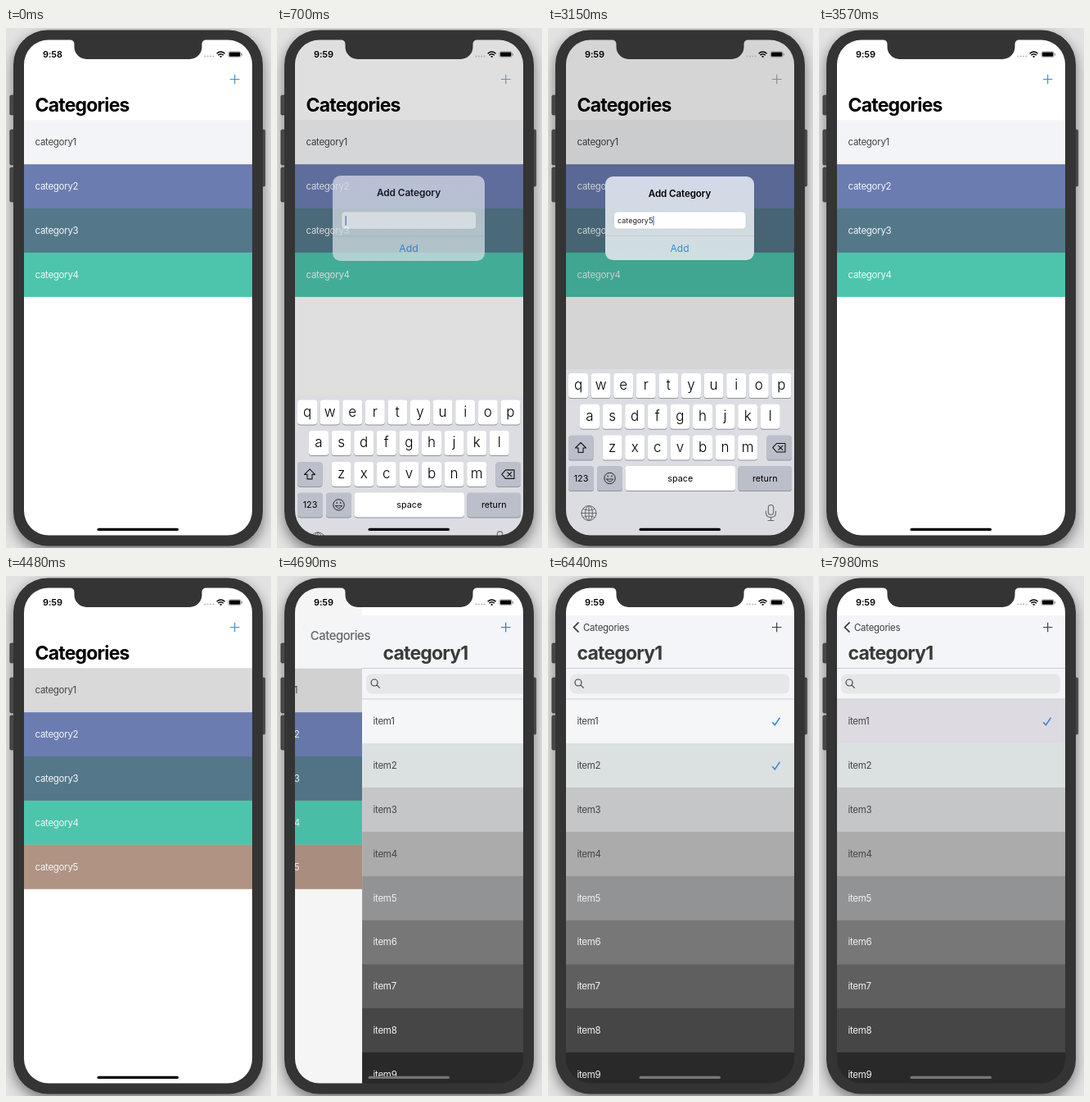
These frames come from a looping animation (324x634 px, 8000 ms). An HTML page:

```html
<!DOCTYPE html>
<html lang="en">
<head>
<meta charset="utf-8">
<title>Category list</title>
<style>
  html, body { margin: 0; width: 100%; height: 100%; overflow: hidden; background: #d2d2d2; }
  svg { display: block; width: 324px; height: 634px; }
  text { font-family: Inter, Roboto, "Liberation Sans", sans-serif; }
  .row { font-size: 11.5px; letter-spacing: -.025em; }
  .title { font-size: 23px; font-weight: 700; letter-spacing: -.035em; }
  .key { font-size: 17px; font-weight: 300; text-anchor: middle; }
  .label { font-size: 10.8px; text-anchor: middle; }
</style>
</head>
<body>
<svg id="stage" viewBox="0 0 324 634" xmlns="http://www.w3.org/2000/svg">
  <defs>
    <clipPath id="screen"><rect x="21.500" y="13" width="280" height="607"/></clipPath>
    <filter id="soft" x="-20%" y="-20%" width="140%" height="140%"><feGaussianBlur stdDeviation="8"/></filter>
    <linearGradient id="glass" x1="0" y1="0" x2="0" y2="1">
      <stop offset="0" stop-color="#d4d9e8"/>
      <stop offset=".5" stop-color="#d2dae1"/>
      <stop offset="1" stop-color="#cfdfe0"/>
    </linearGradient>
  </defs>

  <rect width="324" height="634" fill="#e2e2e2"/>
  <rect x="9" y="8" width="305" height="630" rx="42" opacity=".48" filter="url(#soft)"/>
  <g fill="#484848" stroke="#2c2c2c" stroke-width=".6">
    <rect x="4.800" y="82" width="6" height="24" rx="1.500"/>
    <rect x="4.800" y="124" width="6" height="43" rx="1.500"/>
    <rect x="4.800" y="170" width="6" height="42" rx="1.500"/>
    <rect x="311" y="124" width="5.700" height="69" rx="1.500"/>
  </g>

  <g clip-path="url(#screen)">
    <rect x="20" y="12" width="284" height="610" fill="#fff"/>
    <g id="list"></g>
    <rect id="shade" x="20" y="12" width="284" height="610"/>
    <rect id="bar" x="20" y="48" width="284" height="65" fill="#f4f5f8"/>
    <g id="detail"></g>

    <text id="backTitle">Categories</text>
    <text id="itemTitle" class="title" y="102" fill="#3a3a3a">category1</text>
    <path id="chevron" d="M37.500 56.500L31.500 62.500L37.500 68.500" fill="none" stroke="#333" stroke-width="1.700"/>

    <rect id="dim" x="20" y="12" width="284" height="610"/>
    <path id="plus" d="M274 62.500H285.500M279.700 56.800V68.300" fill="none" stroke-width="1.200"/>

    <text id="clock" x="45" y="36" font-size="11" font-weight="600" letter-spacing="-.1"></text>
    <path d="M242.500 34.500H255" stroke="#aaa" stroke-width="1.700" stroke-dasharray="1.700 1.700"/>
    <g fill="none" stroke="#000" stroke-width="1.500">
      <path d="M257.600 31.200Q262.600 26.800 267.600 31.200M259.400 33.100Q262.600 30.300 265.800 33.100"/>
      <path d="M261.600 34.900H263.600" stroke-width="1.600"/>
    </g>
    <rect x="271.800" y="28.700" width="15.600" height="7" rx="2" fill="none" stroke="#999" stroke-width=".7"/>
    <rect x="272.800" y="29.600" width="13.600" height="5.200" rx="1.200"/>
    <rect x="288" y="31" width="1" height="2.400" rx=".5" fill="#888"/>

    <g id="keyboard"></g>

    <g id="alert">
      <rect x="70" y="181" width="182" height="102" rx="9.500" fill="url(#glass)"/>
      <text x="161" y="205.500" font-size="11.600" font-weight="600" text-anchor="middle" letter-spacing="-.1">Add Category</text>
      <rect x="80.500" y="224" width="161.500" height="21" rx="4.500" fill="#fff" stroke="#c3c9d0" stroke-width=".7"/>
      <text id="entry" x="85" y="238" font-size="9" fill="#222"></text>
      <rect id="caret" y="229" width="1.100" height="11.500" fill="#4267d8"/>
      <path d="M70 253.300H252" stroke="#bac4cb" stroke-width=".7"/>
      <text x="161" y="272.500" font-size="12" text-anchor="middle" fill="#318ae2">Add</text>
    </g>
    <rect id="home" x="111.500" y="609.700" width="99.500" height="3.400" rx="1.700"/>
  </g>

  <!-- phone body with the screen cut out -->
  <path fill="#343434" fill-rule="evenodd" d="M51 2.500H272A42 42 0 0 1 314 44.500V589.500A42 42 0 0 1 272 631.500H51A42 42 0 0 1 9 589.500V44.500A42 42 0 0 1 51 2.500Z
    M52 14.500H78Q83.500 14.500 83.500 20V23A15 15 0 0 0 98.500 38H224.500A15 15 0 0 0 239.500 23V20Q239.500 14.500 245 14.500H271A30 30 0 0 1 301 44.500V588.500A30 30 0 0 1 271 618.500H52A30 30 0 0 1 22 588.500V44.500A30 30 0 0 1 52 14.500Z"/>
</svg>

<script>
const LOOP = 8000, STEP = 70, WIDTH = 278.5, PITCH = 53.85;
const $ = id => document.getElementById(id);

function add(parent, tag, attrs, text) {
  const el = document.createElementNS('http://www.w3.org/2000/svg', tag);
  for (const k in attrs) el.setAttribute(k, attrs[k]);
  if (text) el.textContent = text;
  parent.appendChild(el);
  return el;
}
const set = (el, attrs) => { for (const k in attrs) el.setAttribute(k, attrs[k]); };

function addRow(parent, top, label, color, ink) {
  const g = add(parent, 'g', {});
  const fill = add(g, 'rect', { x: 22, y: top, width: 284, height: PITCH + .2, fill: color });
  add(g, 'text', { class: 'row', x: 35.5, y: top + 31.1, fill: ink }, label);
  return { g, fill };
}

const categories = ['#f3f4f7', '#6b7cb1', '#54788a', '#4dc5ad', '#b09383'].map((c, i) =>
  addRow($('list'), 112.3 + i * PITCH, 'category' + (i + 1), c, i ? '#f4f6f8' : '#444'));

const detail = $('detail');
add(detail, 'rect', { x: 22, y: 12, width: 284, height: 610, fill: '#fff' });
add(detail, 'rect', { x: 22, y: 48, width: 284, height: 102, fill: '#f4f5f8' });
add(detail, 'rect', { x: 27, y: 119.5, width: 268, height: 24, rx: 6.5, fill: '#e6e7e9' });
add(detail, 'path', {
  d: 'M41 130A4 4 0 1 1 33 130A4 4 0 1 1 41 130M39.800 132.800L43.600 136.600',
  fill: 'none', stroke: '#444', 'stroke-width': 1.2
});
const items = ['#f4f6f8', '#dae1e0', '#c5c6c7', '#ababac', '#929394', '#777', '#5f5f5f', '#464646', '#292929']
  .map((c, i) => addRow(detail, 150 + i * PITCH, 'item' + (i + 1), c, i < 4 ? '#444' : '#f2f2f2'));
add(detail, 'path', { d: 'M22 112.500H304M22 150H304', stroke: '#c9cacc', 'stroke-width': .9 });
const checks = [177.3, 231.2].map(y => add(detail, 'path', {
  d: `M274.300 ${y + 1}L277.300 ${y + 4.4}L283.500 ${y - 4.6}`,
  fill: 'none', stroke: '#3f86d6', 'stroke-width': 1.6
}));

const board = $('keyboard');
function addKey(x, y, w, label, cls = 'key', color = '#fff') {
  add(board, 'rect', { x, y: y + 1, width: w, height: 30, rx: 3.6, fill: '#8f9299' });
  add(board, 'rect', { x, y, width: w, height: 30, rx: 3.6, fill: color });
  if (label) add(board, 'text', { class: cls, x: x + w / 2, y: y + (cls === 'key' ? 20.2 : 18.8) }, label);
}
add(board, 'rect', { x: 20, y: 416, width: 284, height: 206, fill: '#dcdde2' });
[['qwertyuiop', 25, 421], ['asdfghjkl', 39, 458.7], ['zxcvbnm', 66.6, 496.5]].forEach(([keys, x, y]) =>
  [...keys].forEach((k, i) => addKey(x + i * 27.6, y, 24, k)));
const GRAY = '#bbbfc9';
addKey(25, 496.5, 30.5, '', 'key', GRAY);
addKey(267.5, 496.5, 30.5, '', 'key', GRAY);
addKey(25, 534, 31, '123', 'label', GRAY);
addKey(60, 534, 31, '', 'label', GRAY);
addKey(94.5, 534, 134.5, 'space', 'label');
addKey(232.5, 534, 65.5, 'return', 'label', GRAY);

const icon = (d, color, width) => add(board, 'path', { d, fill: 'none', stroke: color, 'stroke-width': width, 'stroke-linejoin': 'round', 'stroke-linecap': 'round' });
icon('M40 505.500L46.500 512H43V517.500H37V512H33.500Z', '#111', 1.1);
icon('M279.500 506.500H290V517H279.500L274.800 511.700ZM281.800 509.300L286.800 514.300M286.800 509.300L281.800 514.300', '#111', 1.1);
add(board, 'circle', { cx: 75.5, cy: 549, r: 6.7, fill: 'none', stroke: '#222', 'stroke-width': 1 });
icon('M73.200 546V547M77.800 546V547', '#222', 1.2);
icon('M71.500 550H79.500Q75.500 556.500 71.500 550Z', '#222', .9);
add(board, 'circle', { cx: 50, cy: 591.5, r: 9, fill: 'none', stroke: '#666', 'stroke-width': 1 });
add(board, 'ellipse', { cx: 50, cy: 591.5, rx: 4.4, ry: 9, fill: 'none', stroke: '#666', 'stroke-width': 1 });
icon('M50 582.500V600.500M41 591.500H59M43 586.500Q50 589.500 57 586.500M43 596.500Q50 593.500 57 596.500', '#666', .9);
add(board, 'rect', { x: 269.3, y: 581.5, width: 6.4, height: 12, rx: 3.2, fill: 'none', stroke: '#666', 'stroke-width': 1.1 });
icon('M266.500 589V591Q266.500 596.500 272.500 596.500Q278.500 596.500 278.500 591V589M272.500 596.500V600.500M269 600.500H276', '#666', 1.1);

const clamp = x => Math.min(1, Math.max(0, x));
const ramp = (t, from, to) => clamp((t - from) / (to - from));
const ease = x => x * x * (3 - 2 * x);
const easeOut = x => 1 - (1 - x) ** 3;
const lerp = (a, b, p) => a + (b - a) * p;
const mix = (a, b, p) => `rgb(${a.map((v, i) => Math.round(lerp(v, b[i], p)))})`;
// critically damped spring, rate per second
function spring(ms, rate) {
  if (ms <= 0) return 0;
  const a = ms / 1000 * rate;
  return a > 9 ? 1 : 1 - (1 + a) * Math.exp(-a);
}

const TYPED = 'category5';
const KEY_TIMES = [1190, 1330, 1610, 1750, 1890, 2100, 2240, 2520, 2730];
const BLUE = [66, 139, 202], FADED = [142, 142, 144], DARK = [62, 62, 64], BLACK = [0, 0, 0];

function drawAlert(t) {
  const closing = ease(ramp(t, 3200, 3540));
  const shown = ease(ramp(t, 480, 800)) * (1 - closing);
  const up = easeOut(ramp(t, 480, 960)) * (1 - closing);
  const scale = t < 2000 ? lerp(1.2, 1, easeOut(ramp(t, 480, 900))) : 1;
  set($('dim'), { opacity: .165 * shown });
  set(board, { transform: `translate(0 ${204 * (1 - up)})`, visibility: up > 0 ? 'visible' : 'hidden' });
  set($('alert'), { opacity: shown, transform: `translate(161 232) scale(${scale}) translate(-161 -232)` });
  const entry = $('entry');
  entry.textContent = TYPED.slice(0, KEY_TIMES.filter(k => t >= k).length);
  const end = entry.textContent ? entry.getComputedTextLength() : 0;
  set($('caret'), { x: 85.2 + end });
  return shown;
}

function drawPush(t, shown) {
  const p = spring(t - 4514, 14);
  set($('list'), { transform: `translate(${-.31 * WIDTH * p} 0)` });
  set($('shade'), { opacity: .055 * p });
  set($('bar'), { opacity: p });
  set(detail, { transform: `translate(${WIDTH * (1 - p)} 0)`, visibility: p > 0 ? 'visible' : 'hidden' });
  // the large title shrinks into the back label
  set($('backTitle'), {
    x: lerp(35.5, 43, p), y: lerp(102, 66.7, p ** 1.08),
    'font-size': lerp(23, 11.4, p),
    'font-weight': Math.round(lerp(700, 400, p * p)),
    'letter-spacing': lerp(-.8, -.23, p),
    fill: mix(BLACK, DARK, p),
    opacity: 1 - 1.4 * p * (1 - p)
  });
  set($('itemTitle'), { x: 35.5 + 319 * (1 - p), opacity: p > 0 ? 1 : 0 });
  set($('chevron'), { opacity: ramp(p, .7, 1) });
  set($('plus'), { stroke: p > 0 ? mix(BLUE, DARK, p ** 3) : mix(BLUE, FADED, shown) });
  set($('home'), { fill: mix(BLACK, [119, 119, 119], clamp(p * 1.4)) });
}

function render(t) {
  $('clock').textContent = t < 70 ? '9:58' : '9:59';
  drawPush(t, drawAlert(t));
  set(categories[0].fill, { fill: t >= 4200 ? '#d9d9da' : '#f3f4f7' });
  set(categories[4].g, { opacity: t >= 3640 ? 1 : 0 });
  set(checks[0], { opacity: t >= 5740 ? 1 : 0 });
  set(checks[1], { opacity: t >= 6440 && t < 7140 ? 1 : 0 });
  set(items[0].fill, { fill: mix([244, 246, 248], [221, 218, 226], ramp(t, 7840, 7980)) });
}

const start = performance.now();
function tick() {
  const t = (performance.now() - start) % LOOP;
  render(Math.floor(t / STEP) * STEP);
  requestAnimationFrame(tick);
}
tick();
</script>
</body>
</html>
```
